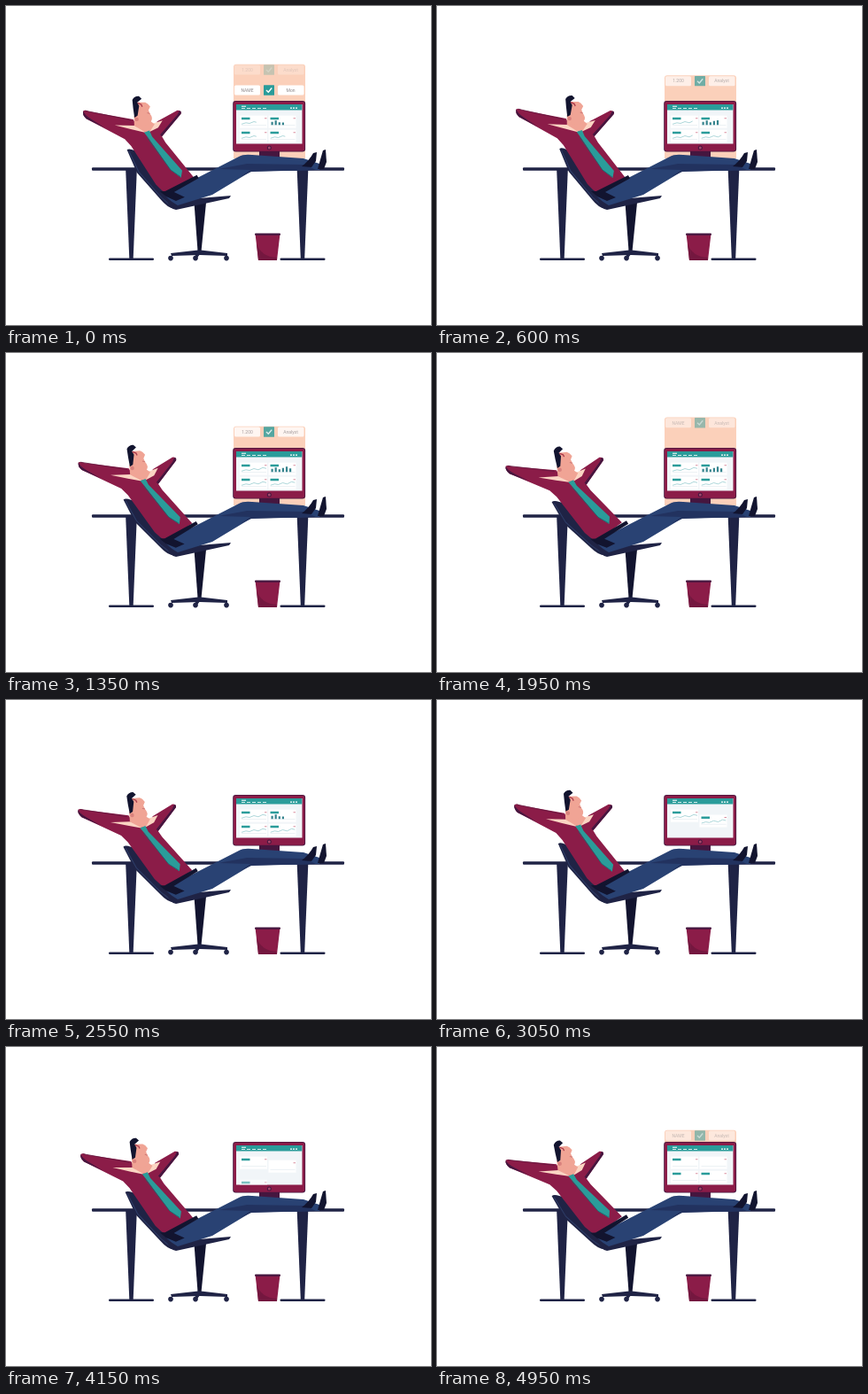
An HTML page with a canvas for the animation above (5 s loop, 480 px wide and 360 px high).

```html
<!DOCTYPE html>
<html lang="en">
<head>
<meta charset="utf-8">
<title>Relaxing at the desk</title>
<style>
  html, body { margin: 0; width: 100%; height: 100%; overflow: hidden; background: #fff; }
  canvas { display: block; width: 480px; height: 360px; }
</style>
</head>
<body>
<canvas id="stage"></canvas>
<script>
const LOOP = 5000;
const NAVY = '#1f2345', BLUE = '#294273', MAROON = '#8b1c48', PLUM = '#45163f';
const SKIN = '#f0a495', PALE = '#fbd5c3', PEACH = '#fbd0ba', TEAL = '#2a9c9a', HAIR = '#12142f';

const canvas = document.getElementById('stage');
const dpr = window.devicePixelRatio || 1;
canvas.width = 480 * dpr;
canvas.height = 360 * dpr;
const ctx = canvas.getContext('2d');

const clamp = v => Math.max(0, Math.min(1, v));
const span = (t, start, length) => clamp((t - start) / length);

function poly(color, ...p) {
  ctx.fillStyle = color;
  ctx.beginPath();
  for (let i = 0; i < p.length; i += 2) ctx.lineTo(p[i], p[i + 1]);
  ctx.closePath();
  ctx.fill();
}

function line(color, width, ...p) {
  ctx.strokeStyle = color;
  ctx.lineWidth = width;
  ctx.beginPath();
  for (let i = 0; i < p.length; i += 2) ctx.lineTo(p[i], p[i + 1]);
  ctx.stroke();
}

function path(color, d) {
  ctx.fillStyle = color;
  ctx.fill(new Path2D(d));
}

function rect(color, x, y, w, h, r = 0) {
  ctx.fillStyle = color;
  ctx.beginPath();
  ctx.roundRect(x, y, w, h, r);
  ctx.fill();
}

function dot(color, x, y, r) {
  ctx.fillStyle = color;
  ctx.beginPath();
  ctx.arc(x, y, r, 0, Math.PI * 2);
  ctx.fill();
}

function rotated(angle, x, y, draw) {
  ctx.save();
  ctx.translate(x, y);
  ctx.rotate(angle);
  ctx.translate(-x, -y);
  draw();
  ctx.restore();
}

function drawDesk() {
  rect(NAVY, 97, 182.2, 285, 3.6, 1);
  for (const x of [141.5, 335]) {
    poly(NAVY, x - 6.3, 185, x + 6.3, 185, x + 2.2, 285, x - 2.2, 285);
    rect(NAVY, x - 25.5, 284.4, 51, 2.5, 1.2);
  }
}

function drawBin() {
  poly(MAROON, 281.5, 257, 309.5, 257, 306, 287, 285, 287);
  path('#74173f', 'M283 268 Q288 283 306 284 L306 287 L285 287 Z');
  rect(PLUM, 281, 256.5, 29, 2.2, 1);
}

// Cards rise from behind the monitor, peak, then fade near the top.
const PITCH = 23, RISE = 0.0555;

function drawCards(t) {
  const intro = t > 4500;
  const start = intro ? 100 + RISE * 4950 : 95;
  const cards = [];
  for (let k = intro ? 0 : -1; k < (intro ? 1 : 5); k++) {
    const y = start + PITCH * k - RISE * t;
    if (y > 67.5 && y < 118) cards.push({ k, y });
  }
  if (!cards.length) return;
  const top = cards[0].y - 6.3;
  rect(PEACH, 257, top, 81, (intro ? 140 : 172) - top, [3, 3, 0, 0]);
  for (const { k, y } of cards) {
    ctx.globalAlpha = clamp(Math.min((y - 64) / 31, (104 - y) / 8));
    rect('#fff', 258, y - 5.5, 29, 11, 1.5);
    rect('#fff', 307, y - 5.5, 29.5, 11, 1.5);
    rect(TEAL, 291, y - 5.7, 12, 11.4, 0.5);
    line('#fff', 1.4, 294, y, 296.3, y + 2.3, 300.2, y - 2.4);
    ctx.fillStyle = '#8d8789';
    ctx.font = '5px Roboto, sans-serif';
    ctx.textAlign = 'center';
    ctx.fillText(k % 2 ? '1.200' : 'NAME', 272.5, y + 1.8);
    ctx.fillText(k === 0 && !intro ? 'Mon' : 'Analyst', 321.5, y + 1.8);
    ctx.globalAlpha = 1;
  }
}

function drawPanel(i, t, chart) {
  const entering = t > 3600;
  const shown = entering
    ? span(t, 3700 + 150 * i, 400)
    : 1 - span(t, 2610 + 170 * (3 - i), 280);
  if (!shown) return;
  const x = i % 2 ? 298.5 : 266;
  const y = (i < 2 ? 125.8 : 141.8) + 16 * (1 - shown);
  ctx.globalAlpha = clamp(shown * 1.6);
  rect('#fff', x - 2, y - 2, 31, 14);
  // the bar chart's heading arrives together with its bars
  if (i !== 1 || !entering) rect(TEAL, x, y, 9.5, 2.5);
  rect('#d98fa0', x + 26, y + 0.4, 2.5, 1);
  line('#d8e2e8', 0.5, x, y + 8.7, x + 28, y + 8.7);
  if (i === 1 && t < 2800) {
    [3.5, 5, 3, 4.5, 6, 4].forEach((h, n) => {
      const grow = clamp(chart * 6 - n);
      rect('#36848e', x + 1 + 4.1 * n, y + 8.4 - h * grow, 2.2, h * grow);
    });
  } else if (chart) {
    ctx.save();
    ctx.beginPath();
    ctx.rect(x, y, 28 * chart, 12);
    ctx.clip();
    line('#8cc6cb', 0.7, x, y + 7.5, x + 5, y + 6, x + 9, y + 6.7,
      x + 14, y + 4.7, x + 19, y + 6, x + 24, y + 3.5, x + 28, y + 4.5);
    ctx.restore();
  }
  ctx.globalAlpha = 1;
}

function drawMonitor(t) {
  rect(PLUM, 286, 163, 23, 8);
  rect(PLUM, 256.2, 107, 81.9, 57.5, 3.2);
  rect(MAROON, 257, 107.8, 80.3, 56, 3);
  rect('#f1f5f8', 260, 111, 74.5, 44.5);
  dot(PLUM, 297.3, 160, 2.5);
  dot('#a8476b', 297.3, 160, 1.5);
  ctx.save();
  ctx.beginPath();
  ctx.rect(260, 111, 74.5, 44.5);
  ctx.clip();
  const growth = t > 3600 ? 0 : 0.6 + 0.4 * span(t, 0, 1150);
  const bars = growth * (1 - 0.4 * span(t, 2200, 300));
  for (let i = 0; i < 4; i++) {
    drawPanel(i, t, i === 1 && t < 2800 ? bars : growth);
  }
  rect(TEAL, 260, 111, 74.5, 6.5);
  rect('#fff', 266, 112.8, 5, 1);
  for (let i = 0; i < 5; i++) rect('#d6efed', 266 + 6 * i, 115, 4, 1);
  for (let i = 0; i < 3; i++) dot('#fff', 322 + 3 * i, 115.2, 0.9);
  ctx.restore();
}

function drawChairBase() {
  poly(HAIR, 212.5, 222, 226, 222, 220.3, 279, 216.7, 279);
  poly(NAVY, 217, 275.5, 220, 275.5, 250, 279, 250, 282, 219, 281, 187, 282, 186, 279);
  poly(NAVY, 216, 277, 220, 279, 216, 284, 212.5, 284);
  for (const x of [186, 214, 249]) dot(NAVY, x, 284.6, 2.8);
}

function drawChairBack() {
  path(NAVY, 'M138.5 161 Q141 159 147 162 L160 168 L200 218 L192 229 Q184 230 174 217 L149 187 Z');
  line('#2d3c66', 1, 141, 163, 151, 186, 176, 216, 188, 227);
}

function drawTorso() {
  // arms and shirt
  path(MAROON, 'M90 116 Q92 115 96 117 L146 127 L153 140 L170 138 L173 130 L196 118 Q201 118 200 122 L178 147 L182 154 L213 194 L182 212 Q176 208 170 201 L143 157 L136 149 L93 125 Q88 120 90 116 Z');
  path(PLUM, 'M90 116 Q90 120 99 126 L114 136 L93 125 Q88 120 90 116 Z');
  line('#64183f', 0.8, 92, 116, 144, 128);
  path(PLUM, 'M198 119 Q201 118 200 122 L178 147 L176 145 L196 123 Z');
  // hands and neck
  poly(PALE, 125, 133, 148, 134, 162, 143, 143, 138);
  poly(PALE, 161, 143, 168, 132, 179, 129, 174, 137);
  poly(SKIN, 147, 123, 165, 129, 170, 133, 164, 142, 158, 141, 147, 134);
  // head
  path(SKIN, 'M151 108 L160 108 Q163 109 165.5 113 L163.5 117 L165 121 Q169 126 166 130 Q160 136 153 133 L147 124 Z');
  path(HAIR, 'M145.5 105 Q148 100.5 153 101 L156 104 L151 108 L153 112 L151 123 L147.5 125 Q146 114 145.5 105 Z');
  line('#a93a4c', 1.3, 151.5, 108.5, 155.5, 110.5, 156.5, 113);
  line('#cd7877', 1, 162, 120, 165, 121);
  dot('#d9827d', 150, 127, 2.2);
  // tie
  poly(TEAL, 158, 142, 164, 140, 167, 147, 200, 186, 198.5, 194, 187, 185, 163, 149);
  line('#17676e', 0.8, 161.5, 148, 187, 185, 198, 193);
}

function drawLegs() {
  path(NAVY, 'M182 220 L254 214 L252 217 L192 230 Q185 229 182 220 Z');
  path(BLUE, 'M179 213 L216 194 L263 170 Q268 167 278 168 L336 172 L354 178 L354 185 L277 186.5 L233 213 L194 225 Q185 220 179 213 Z');
  path('#22325f', 'M240 184 L272 178 L337 179 L350 185 L277 187 L264 193 L276 185 Z');
  path(HAIR, 'M334 181 Q342 175 347 166 L351 165 L350 175 L345 182 Z');
  path(HAIR, 'M352 184 Q355 173 358 163 L361 162 L362 176 L359 184 Z');
}

function drawBelt() {
  poly(HAIR, 174, 209, 180, 209, 216, 191, 218, 194.5, 190, 210, 202, 216, 192, 220, 181, 215);
}

function draw(t) {
  ctx.setTransform(dpr, 0, 0, dpr, 0, 0);
  rect('#fff', 0, 0, 480, 360);
  const lean = (1 - Math.cos(2 * Math.PI * (t - 450) / 3020)) / 2;
  drawDesk();
  drawBin();
  drawCards(t);
  drawMonitor(t);
  drawChairBase();
  rotated(-0.14 * lean, 185, 228, drawChairBack);
  rotated(-0.112 * lean, 187, 230, drawTorso);
  drawLegs();
  rotated(-0.06 * lean, 187, 225, drawBelt);
}

function tick(now) {
  draw(now % LOOP);
  requestAnimationFrame(tick);
}
requestAnimationFrame(tick);
</script>
</body>
</html>
```
